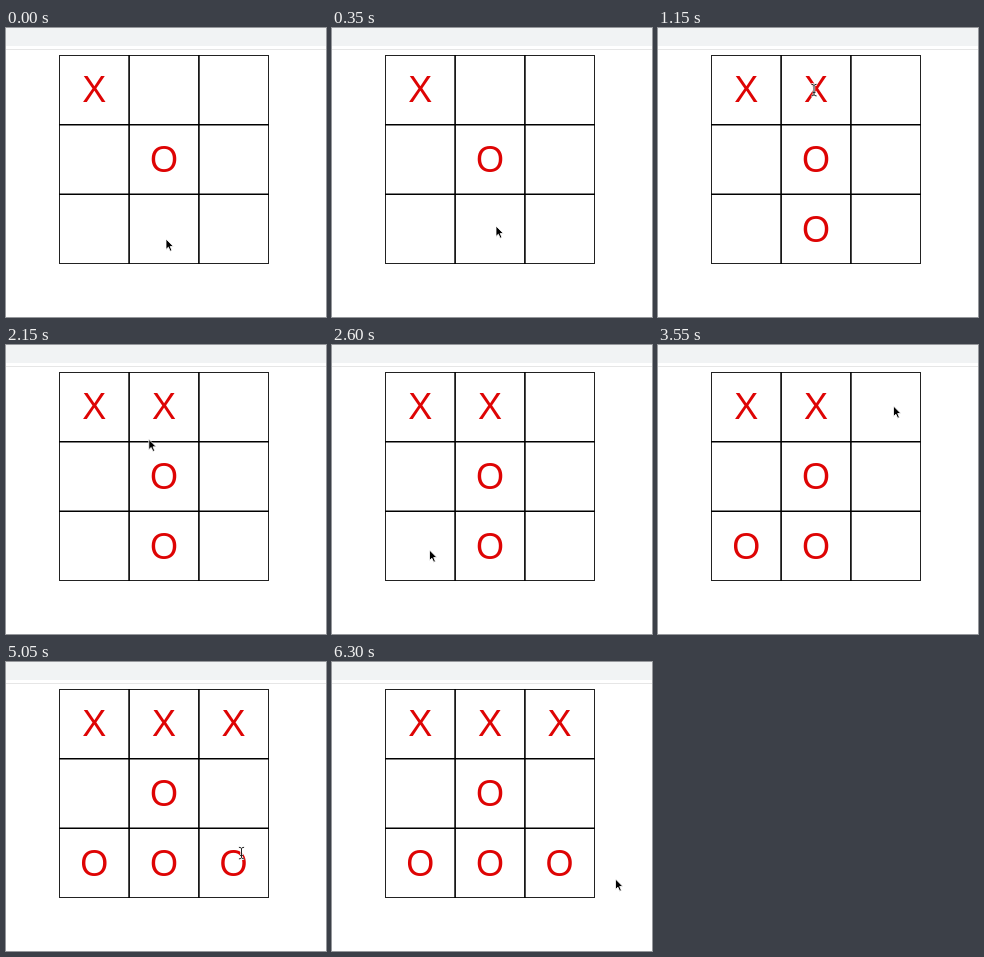
Animation, 320 px wide and 289 px high, one loop 6350 ms. Source, as an HTML page:

```html
<!DOCTYPE html>
<html lang="en">
<head>
<meta charset="utf-8">
<title>Noughts and crosses</title>
<style>
  html, body { margin: 0; width: 100%; height: 100%; overflow: hidden; background: #fff; }
  svg { display: block; width: 100vw; height: 100vh; }
  text { font: 36px "Liberation Sans", Arial, sans-serif; fill: #de0404; text-anchor: middle; }
</style>
</head>
<body>
<svg viewBox="0 0 320 289">
  <rect width="320" height="289" fill="#fff"/>
  <rect width="320" height="18" fill="#f1f3f4"/>
  <path d="M0 21.5H320" stroke="#e6e6e6"/>
  <rect x="53.5" y="27.5" width="209" height="208" fill="none" stroke="#222"/>
  <path d="M123.1 27V236M192.9 27V236M53 96.8H263M53 166.2H263" stroke="#000" stroke-width="1.6"/>
  <g id="marks"></g>
  <g id="cursor">
    <path id="arrow" d="M0 0V10.4L2.4 8.2L4.2 12.2L5.9 11.4L4.2 7.5H7.4Z" fill="#000" stroke="#fff" stroke-width=".8"/>
    <g id="beam" fill="none">
      <path d="M-2.6 -5.7Q0 -5.7 0 -4.2Q0 -5.7 2.6 -5.7M0 -4.2V4.4M-2.6 5.9Q0 5.9 0 4.4Q0 5.9 2.6 5.9M-1.5 2.4H1.5" stroke="#fff" stroke-width="2.4"/>
      <path d="M-2.6 -5.7Q0 -5.7 0 -4.2Q0 -5.7 2.6 -5.7M0 -4.2V4.4M-2.6 5.9Q0 5.9 0 4.4Q0 5.9 2.6 5.9M-1.5 2.4H1.5" stroke="#222"/>
    </g>
  </g>
</svg>
<script>
const LOOP = 6350, STEP = 50;
const $ = id => document.getElementById(id);

// Moves in playing order: symbol, column, row, time of the click.
const moves = [
  ["X", 0, 0, 0], ["O", 1, 1, 0], ["O", 1, 2, 450], ["X", 1, 0, 1150],
  ["O", 0, 2, 2950], ["X", 2, 0, 3950], ["O", 2, 2, 5050]
].map(([symbol, col, row, at]) => {
  const x = 88.2 + col * 69.7, y = 62 + row * 69.6;
  const el = document.createElementNS("http://www.w3.org/2000/svg", "text");
  el.textContent = symbol;
  el.setAttribute("x", x);
  el.setAttribute("y", y + 12.4);
  $("marks").append(el);
  return { x, y, at, el };
});

// Pointer stops: time, x, y and the easing used to get there.
const smooth = k => k * k * (3 - 2 * k);
const linear = k => k;
const easeOut = k => 1 - (1 - k) ** 2;
const stops = [
  [0, 160, 211, linear], [300, 164, 198, smooth],
  [600, 164, 198, linear], [700, 167, 140, linear], [800, 170, 86, easeOut], [1100, 156, 62, smooth],
  [1950, 156, 62, linear], [2600, 97.5, 205, smooth], [2750, 89, 207, smooth],
  [3250, 89, 207, linear], [3550, 235.5, 61, smooth],
  [4450, 235.5, 61, linear], [4900, 235.5, 191, smooth],
  [5900, 235.5, 191, linear], [6300, 283.5, 217, smooth]
];

function pointerAt(t) {
  const i = stops.findIndex(s => s[0] > t);
  if (i < 0) return stops.at(-1).slice(1, 3);
  const [t0, x0, y0] = stops[i - 1], [t1, x1, y1, ease] = stops[i];
  const k = ease((t - t0) / (t1 - t0));
  return [x0 + (x1 - x0) * k, y0 + (y1 - y0) * k];
}

function render(t) {
  const [x, y] = pointerAt(t);
  let overText = false;
  for (const m of moves) {
    const placed = t >= m.at;
    m.el.style.display = placed ? "" : "none";
    overText ||= placed && Math.abs(x - m.x) < 14 && Math.abs(y - m.y) < 20;
  }
  $("cursor").setAttribute("transform", `translate(${x} ${y})`);
  $("arrow").style.display = overText ? "none" : "";
  $("beam").style.display = overText ? "" : "none";
}

const start = performance.now();
function tick() {
  const t = (performance.now() - start) % LOOP;
  render(Math.floor(t / STEP) * STEP);
  requestAnimationFrame(tick);
}
tick();
</script>
</body>
</html>
```
